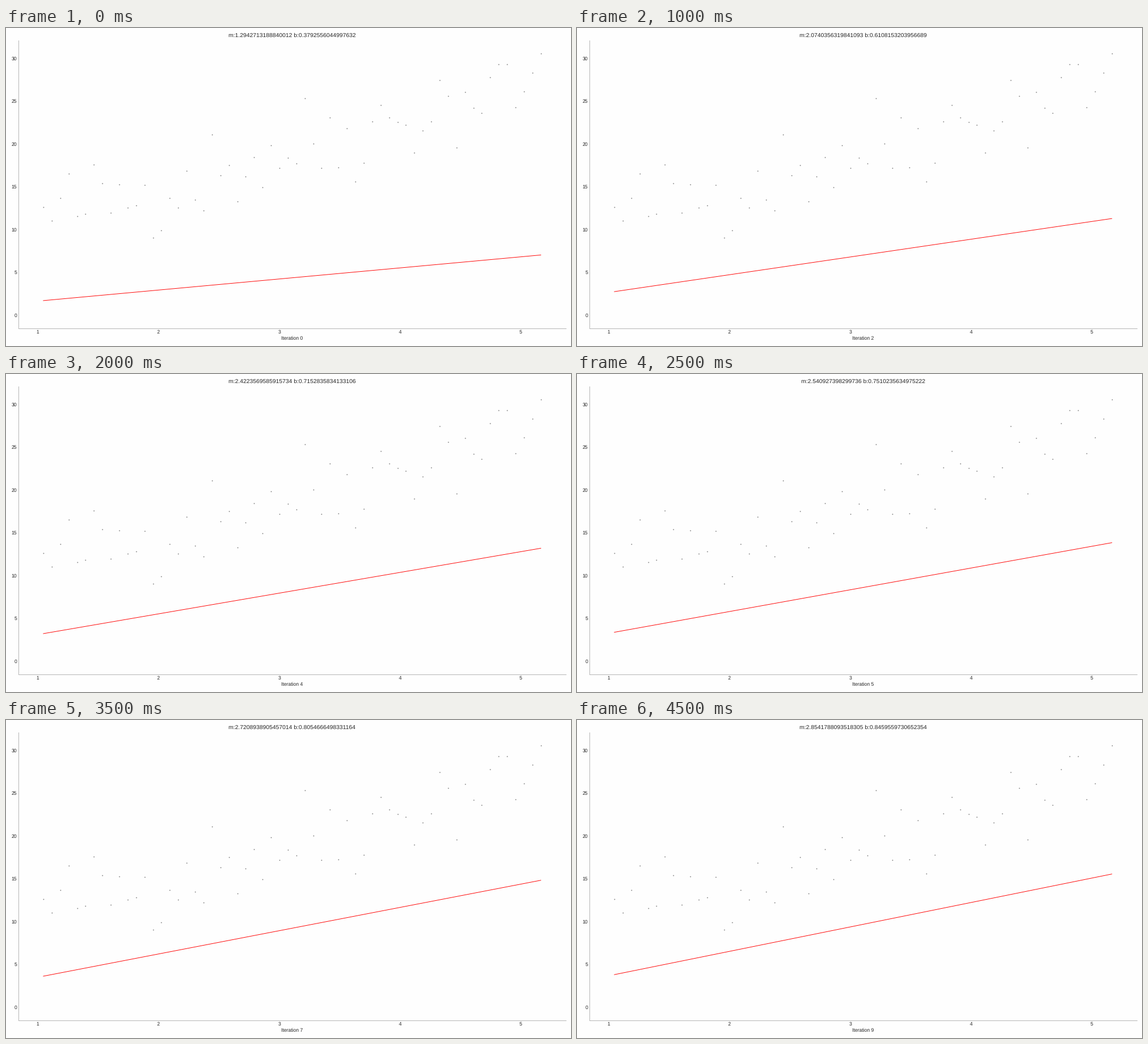
Recreate the animation shown at these times as a matplotlib script. Size 998 by 561 pixels, loop 5000 ms.

```python
import numpy as np
import matplotlib.pyplot as plt
from matplotlib.animation import FuncAnimation
from matplotlib.transforms import ScaledTranslation

W, H, DPI = 998, 561, 62.375
STEPS, RATE = 10, 0.01
PAPER, INK, SPINE, DOT = "#fefefe", "#262626", "#b5b5b5", "#7a7a7a"

plt.rcParams.update({
    "font.family": "Liberation Sans",
    "font.size": 10,
    "axes.titlesize": 12,
    "text.hinting": "none",
    "text.color": INK,
    "axes.labelcolor": INK,
})


def make_data():
    x = np.radians(np.arange(60, 300, 4))
    noise = np.random.RandomState(42).normal(0, 3, len(x))
    return x, 4 * x + 7 + noise


def descend(x, y):
    """Gradient descent on a line fit, with the rate decaying as 1/step."""
    m = b = 0.0
    path = []
    for k in range(STEPS):
        err = y - (m * x + b)
        rate = RATE / (k + 1)
        m += float(rate * 2 * np.mean(x * err))
        b += float(rate * 2 * np.mean(err))
        path.append((m, b))
    return path


def pt(px):
    return px * 72 / DPI


x, y = make_data()
path = descend(x, y)

fig = plt.figure(figsize=(W / DPI, (H + 1e-6) / DPI), dpi=DPI, facecolor=PAPER)
left, right, top, bottom = 22.03, 988.64, 22.2, 530.2
ax = fig.add_axes([left / W, 1 - bottom / H, (right - left) / W, (bottom - top) / H],
                  facecolor=PAPER)

pad_x, pad_y = 0.05 * np.ptp(x), 0.05 * y.max()
ax.set_xlim(x.min() - pad_x, x.max() + pad_x)
ax.set_ylim(-pad_y, y.max() + pad_y)
ax.set_xticks(range(1, 6))
ax.set_yticks(range(0, 31, 5))
ax.tick_params(length=0, labelcolor=INK)
ax.tick_params(axis="x", pad=2.6)
ax.tick_params(axis="y", pad=3.5)
lift = ScaledTranslation(0, 0.7 / DPI, fig.dpi_scale_trans)
for text in ax.get_yticklabels():
    text.set_transform(text.get_transform() + lift)
for side, spine in ax.spines.items():
    spine.set_visible(side in ("left", "bottom"))
    spine.set_color(SPINE)
    spine.set_linewidth(pt(1))

ax.scatter(x, y, s=pt(1.8) ** 2, color=DOT, linewidths=0, snap=False)
line, = ax.plot([], [], color="red", lw=pt(0.95))
title = ax.set_title("", pad=6.9)
label = ax.set_xlabel("", labelpad=3.5)


def update(k):
    m, b = path[k]
    line.set_data(x, m * x + b)
    title.set_text(f"m:{m} b:{b}")
    label.set_text(f"Iteration {k}")
    return line, title, label


anim = FuncAnimation(fig, update, frames=STEPS, interval=500, repeat=True, repeat_delay=0)
plt.show()
```
